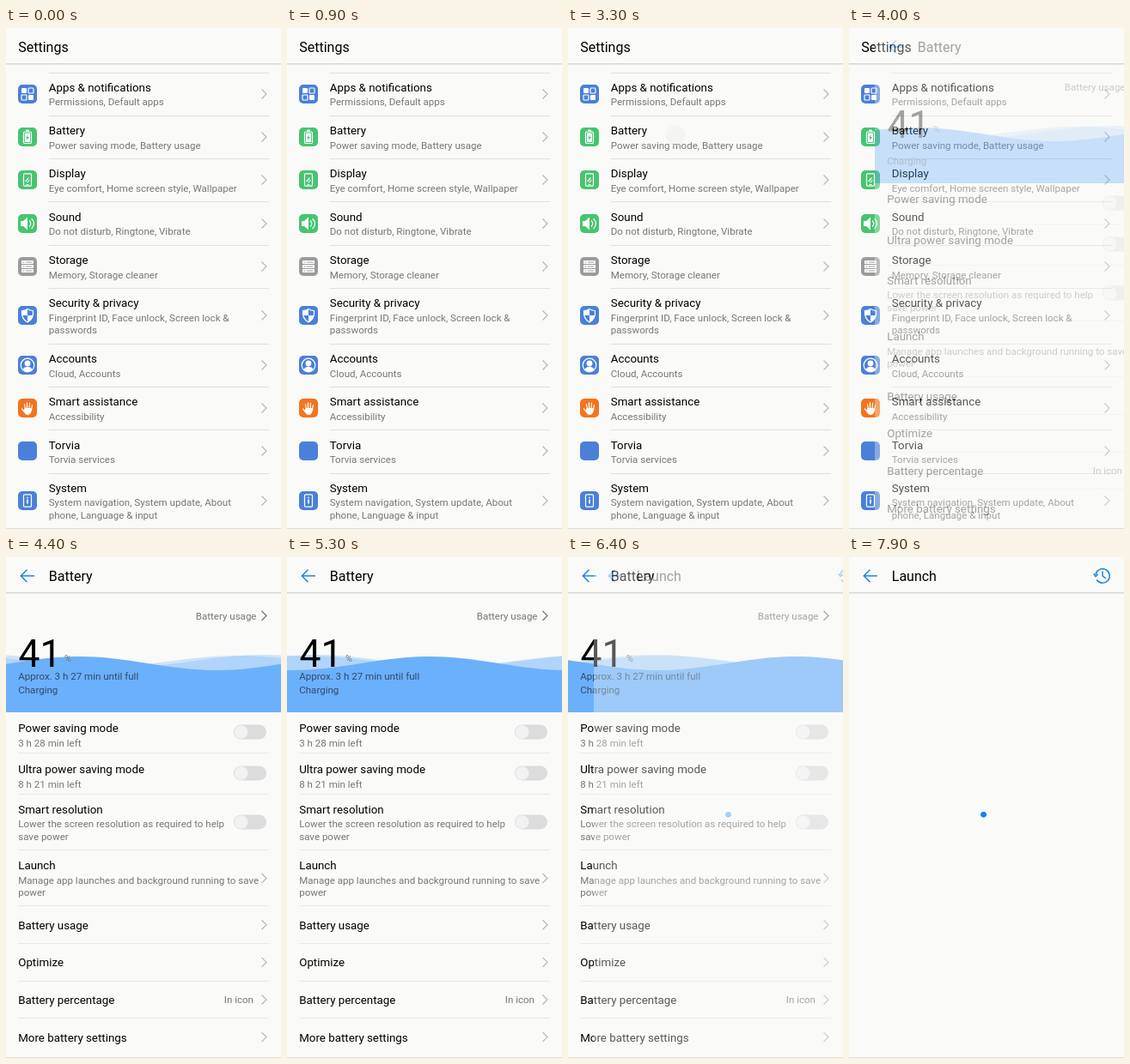
These frames come from a looping animation (320 by 584 pixels, 8000 ms). An HTML page:

```html
<!DOCTYPE html>
<html lang="en">
<head>
<meta charset="utf-8">
<title>Settings walkthrough</title>
<style>
  html, body { margin: 0; width: 100%; height: 100%; overflow: hidden; background: #fafaf8; }
  svg { display: block; }
  text { font-family: Roboto, "Noto Sans", sans-serif; fill: #000; white-space: pre; }
  .head { font-size: 16px; }
  .item { font-size: 13.33px; }
  .sub { font-size: 11.56px; fill: #777; }
  .num { font-size: 44.4px; }
  .unit { font-size: 10.67px; fill: #777; }
  .onwave { font-size: 11.56px; fill: #000; fill-opacity: .58; }
  .end { text-anchor: end; }
  .rule { stroke: #e0e0df; }
  #battery .rule { stroke: #e8e8e7; }
  .line { fill: none; stroke-width: 1.3; }
  .blue { stroke: #1a86e2; stroke-width: 1.5; }
  .w { fill: #fff; }
  .s { fill: none; stroke: #fff; stroke-width: 1.2; stroke-linecap: round; stroke-linejoin: round; }
</style>
</head>
<body>
<svg id="stage" width="320" height="584" viewBox="0 0 320 584"></svg>
<script>
const LOOP = 8000, STEP = 100, SHIFT = 30;
const LEFT = 14.22, INDENT = 49.78;
const BLUE = '#4a80d8', GREEN = '#46c470', GRAY = '#9b9b9b', ORANGE = '#f5731d';

const text = (cls, x, y, s) => `<text class="${cls}" x="${x}" y="${Math.round(y)}">${s}</text>`;
const rule = (x1, x2, y) => `<path class="rule" d="M${x1} ${Math.floor(y) + .5}H${x2}"/>`;
const chevron = (y, color = '#b9b9b9') =>
  `<path class="line" stroke="${color}" d="M297.5 ${y - 5.5}l5.5 5.5l-5.5 5.5"/>`;
const box = (x, y, w, h, r, cls = 'w') =>
  `<rect class="${cls}" x="${x}" y="${y}" width="${w}" height="${h}" rx="${r}"/>`;
const arrow = '<path class="line blue" d="M33 22H17.5M24.5 14.8L17.3 22l7.2 7.2"/>';

const frame = (title, body, x) => `
  <rect width="320" height="584" fill="#fafaf8"/>
  ${text('head', x, 28, title)}
  <rect y="41" width="320" height="1.6" fill="#d9d9d8"/>
  ${body}
  <rect y="583" width="320" height="1" fill="#dcdcdc"/>`;

// Glyphs are centred on 0,0 inside a 22px tile.
const glyphs = {
  apps: box(-7, -7, 6, 6, 1) + box(1, -7, 6, 6, 1, 's') + box(-7, 1, 6, 6, 1, 's') + box(1, 1, 6, 6, 1),
  battery: box(-4.5, -6, 9, 13.5, 1.2, 's') + box(-2, -8.5, 4, 2, .5) + box(-3, -4.5, 6, 10.5, .5) +
    `<path fill="${GREEN}" d="M1-3.500l-3 5h2L-1 5l3-5h-2z"/>`,
  display: box(-4.5, -7.2, 9, 14.4, 1.2, 's') + '<path class="s" d="M-2 1.500l3-3.500M0 3l2-2.500M-1 5.500h2"/>',
  sound: '<path class="w" d="M-8-3h3l5-4.5v15L-5 3h-3z"/><path class="s" d="M2.500-3q2.500 3 0 6M5-5.500q5 5.500 0 11"/>',
  storage: [-7, -2, 3].map(y => box(-7, y, 14, 4, .8) +
    `<path stroke="${GRAY}" d="M-5.500 ${y + 2}h2M-2 ${y + 2}h7"/>`).join(''),
  shield: '<path class="s" d="M0-7.500q3 2 6.500 2Q7.500 4 0 8-7.500 4-6.500-5.500-3-5.500 0-7.500z"/>' +
    '<path class="w" d="M0-7v7h-6.500q-.5-3 0-5.500Q-3-5.500 0-7zM0 0h6.500Q5.500 5 0 8z"/>',
  account: '<circle class="s" r="7.8"/><circle class="w" cy="-2" r="3.400"/><path class="w" d="M-5.500 5.500Q-5 2.500-1.500 2h3Q5 2.500 5.500 5.500 0 10-5.500 5.500z"/>',
  hand: '<path class="s" stroke-width="2" d="M-3.500-4.500l1 6M-.5-6.500v7M2.500-6l-.5 7M5.500-3.500l-1 6M-6.500 1l3 3.500"/>' +
    '<path class="w" d="M-3.500 0h8.500l-.5 4Q3.500 8 0 8-2.500 8-4.500 4z"/>',
  plain: '',
  system: box(-4.5, -7.2, 9, 14.4, 1.2, 's') + box(-.8, -1.5, 1.6, 5, 0) + box(-.9, -4.5, 1.8, 1.8, .9)
};

const settings = [
  [52, BLUE, 'apps', 'Apps &amp; notifications', 'Permissions, Default apps'],
  [102.4, GREEN, 'battery', 'Battery', 'Power saving mode, Battery usage'],
  [152.6, GREEN, 'display', 'Display', 'Eye comfort, Home screen style, Wallpaper'],
  [202.9, GREEN, 'sound', 'Sound', 'Do not disturb, Ringtone, Vibrate'],
  [253.1, GRAY, 'storage', 'Storage', 'Memory, Storage cleaner'],
  [303.4, BLUE, 'shield', 'Security &amp; privacy', 'Fingerprint ID, Face unlock, Screen lock &amp;', 'passwords'],
  [368.3, BLUE, 'account', 'Accounts', 'Cloud, Accounts'],
  [418.5, ORANGE, 'hand', 'Smart assistance', 'Accessibility'],
  [468.8, BLUE, 'plain', 'Torvia', 'Torvia services'],
  [519, BLUE, 'system', 'System', 'System navigation, System update, About', 'phone, Language &amp; input']
];

const settingsRow = ([top, color, glyph, title, ...subs]) => {
  const mid = Math.round(top + (subs.length > 1 ? 32 : 24.6));
  return rule(INDENT, 306, top) +
    `<g transform="translate(25 ${mid})"><rect x="-11" y="-11" width="22" height="22" rx="5" fill="${color}"/>${glyphs[glyph]}</g>` +
    text('item', INDENT, top + 21.85, title) +
    subs.map((s, i) => text('sub', INDENT, top + 38.45 + i * 14.5, s)).join('') + chevron(mid);
};

const toggle = y => `<rect x="265" y="${y - 8.5}" width="38" height="17" rx="8.5" fill="#dcdcdc"/>
  <circle cx="273.7" cy="${y}" r="7.8" fill="#f2f2f2"/>`;

const batteryBody = `
  ${arrow}
  ${text('sub end', 291.5, 73, 'Battery usage')}${chevron(68.5, '#777')}
  <g fill="#6bb0fb"><path id="light" opacity=".3"/><path id="mid" opacity=".3"/><path id="front"/></g>
  ${text('num', 14.6, 128, '41')}${text('unit', 68, 122, '%')}
  ${text('onwave late', LEFT, 143, 'Approx. 3 h 27 min until full')}
  ${text('onwave', LEFT, 159, 'Charging')}
  ${text('item', LEFT, 204, 'Power saving mode')}${text('sub late', LEFT, 220.5, '3 h 28 min left')}${toggle(204)}
  ${text('item', LEFT, 252, 'Ultra power saving mode')}${text('sub late', LEFT, 269, '8 h 21 min left')}${toggle(252)}
  ${text('item', LEFT, 298.7, 'Smart resolution')}
  ${text('sub', LEFT, 315.3, 'Lower the screen resolution as required to help')}
  ${text('sub', LEFT, 330, 'save power')}${toggle(309)}
  ${text('item', LEFT, 364, 'Launch')}
  ${text('sub', LEFT, 380.7, 'Manage app launches and background running to save')}
  ${text('sub', LEFT, 395.3, 'power')}${chevron(374.5)}
  ${['Battery usage', 'Optimize', 'Battery percentage', 'More battery settings'].map((s, i) =>
    text('item', LEFT, 433.7 + i * 43.6, s) + chevron(428.8 + i * 43.6)).join('')}
  ${text('sub end', 288, 520.3, 'In icon')}
  ${[228, 276, 341, 406, 450, 494, 537].map(y => rule(LEFT, 306, y)).join('')}`;

const launchBody = `
  ${arrow}
  <path class="line blue" d="M288.2 26.5A8.2 8.2 0 1 0 287 20.5M284.8 19.5l2.2 3.2 2.8-2.6M295 16.5V22l4 3"/>
  <g id="dots" fill="#0d84f0">${'<circle r="3"/>'.repeat(5)}</g>`;

const taps = [
  { x: 218.5, y: 28.5, r: 10.5, from: 1000, to: 1900 },
  { x: 125, y: 125, r: 12, from: 3200, to: 3700 },
  { x: 125, y: 365, r: 12, from: 5400, to: 6100 }
];

const stage = document.getElementById('stage');
stage.innerHTML = `
  <g>${frame('Settings', settings.map(settingsRow).join(''), LEFT)}</g>
  <g id="battery">${frame('Battery', batteryBody, INDENT)}</g>
  <g id="launch">${frame('Launch', launchBody, INDENT)}</g>
  ${taps.map(p => `<circle class="tap" cx="${p.x}" cy="${p.y}" r="${p.r}" fill="#000" fill-opacity=".05" stroke="#fff" stroke-opacity=".6"/>`).join('')}`;

const $ = id => document.getElementById(id);
const late = document.querySelectorAll('.late');
const tapNodes = document.querySelectorAll('.tap');
const dots = [...$('dots').children];
const clamp = v => Math.max(0, Math.min(1, v));
const ease = p => p < .5 ? 2 * p * p : 1 - 2 * (1 - p) ** 2;

function slideIn(node, t, start) {
  const rest = (1 - clamp((t - start) / 400)) ** 3;
  node.setAttribute('transform', `translate(${SHIFT * rest} 0)`);
  node.setAttribute('opacity', 1 - .65 * rest);
  node.style.display = t < start ? 'none' : '';
}

function wave(id, crest, base, amp) {
  let d = 'M0 181';
  for (let x = 0; x <= 320; x += 8) {
    d += `L${x} ${(base - amp * Math.cos((x - crest) / 320 * 2 * Math.PI)).toFixed(2)}`;
  }
  $(id).setAttribute('d', d + 'V181Z');
}

function draw(t) {
  slideIn($('battery'), t, 4000);
  slideIn($('launch'), t, 6400);
  late.forEach(n => n.style.display = t < 4300 ? 'none' : '');

  const s = (t - 4400) / 1000;
  wave('front', 85 + 90 * s, 124, 8);
  wave('mid', 270 + 80 * s, 121.5, 6.5);
  wave('light', 300 + 60 * s, 121, 7);

  const phase = Math.max(0, t - 6400) % 1500;
  dots.forEach((dot, i) => {
    const a = (345 + 360 * ease(clamp((phase - i * 140) / 940))) * Math.PI / 180;
    dot.setAttribute('cx', 160 + 13.2 * Math.sin(a));
    dot.setAttribute('cy', 313 - 13.2 * Math.cos(a));
  });

  taps.forEach((p, i) =>
    tapNodes[i].setAttribute('opacity', clamp(Math.min((t - p.from) / 200, (p.to - t) / 300))));
}

const begin = performance.now();
function tick() {
  const t = (performance.now() - begin) % LOOP;
  draw(Math.floor(t / STEP) * STEP);
  requestAnimationFrame(tick);
}
tick();
</script>
</body>
</html>
```
